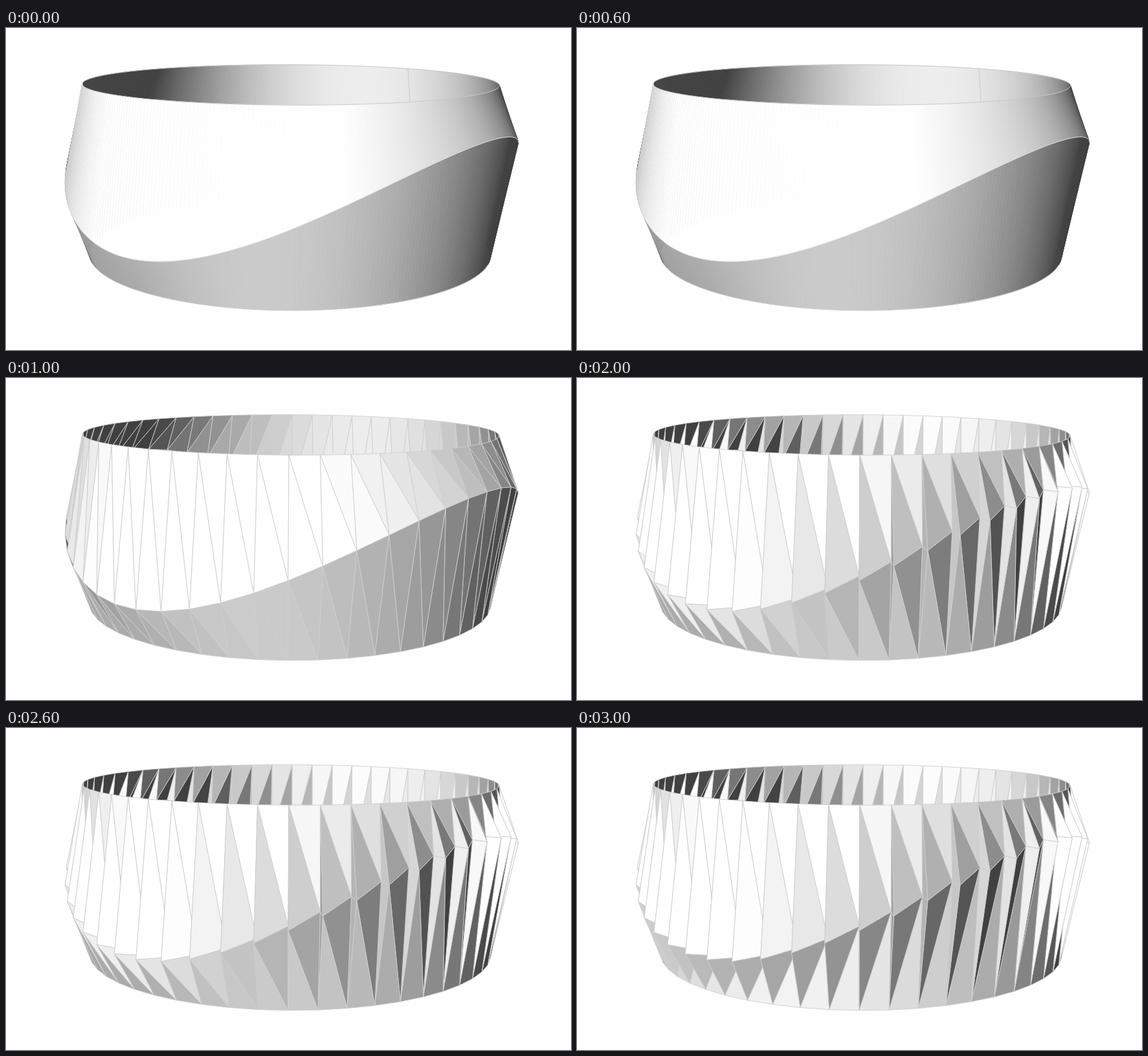
Write an HTML page with a canvas that moves like this. It is 873 px wide and 498 px high and loops after 4 s.

```html
<!DOCTYPE html>
<html lang="en">
<head>
<meta charset="utf-8">
<title>Faceted ring</title>
<style>
html, body { margin: 0; width: 100%; height: 100%; overflow: hidden; background: #fefefe; }
canvas { display: block; }
</style>
</head>
<body>
<canvas id="stage" width="873" height="498"></canvas>
<script>
(() => {
const ctx = document.getElementById('stage').getContext('2d');
const TAU = Math.PI * 2, SIDES = 52, START = -0.0075;
const TOP = 0.546, BOTTOM = -0.285, BULGE = 1.1, NOTCH = 1.03;
const FOCAL = 1404, DIST = 4.58, SIN = 0.2114, COS = 0.9774, ROLL = 0.004;
const EYE = [0, DIST * SIN, DIST * COS], LIGHT = [-0.3, 0.45, 0.7];
const LINE = '#cecece';

const sub = (a, b) => a.map((v, i) => v - b[i]);
const dot = (a, b) => a[0] * b[0] + a[1] * b[1] + a[2] * b[2];
const cross = (a, b) => [
  a[1] * b[2] - a[2] * b[1], a[2] * b[0] - a[0] * b[2], a[0] * b[1] - a[1] * b[0]];

const ring = (angle, r, y) => [r * Math.sin(angle), y, r * Math.cos(angle)];
const upper = a => ring(a, 1, TOP);
const lower = a => ring(a, 1, BOTTOM);
const middle = (a, r = BULGE) => ring(a, r, 0.13 + 0.236 * Math.sin(2 * a - 0.224));

function project([x, y, z]) {
  const scale = FOCAL / (DIST - z * COS - y * SIN);
  const px = x * scale, py = (z * SIN - y * COS) * scale;
  return [439.5 + px - ROLL * py, 249 + py + ROLL * px];
}

function trace(points) {
  ctx.beginPath();
  for (const p of points) ctx.lineTo(...project(p));
}

function shade(points) {
  const [a, b, c, d] = points;
  const n = d ? cross(sub(c, a), sub(d, b)) : cross(sub(b, a), sub(c, a));
  const side = dot(n, sub(EYE, a)) < 0 ? -1 : 1;
  const lit = side * dot(n, LIGHT) / (Math.hypot(...n) || 1);
  const v = Math.min(254, Math.round(255 * (0.25 + Math.max(0, lit))));
  return `rgb(${v},${v},${v})`;
}

// Far faces first; "at" is the angle that stands for a face.
function paint(faces, line) {
  faces.sort((f, g) => Math.cos(f.at) - Math.cos(g.at));
  for (const { points } of faces) {
    trace(points);
    ctx.closePath();
    ctx.fillStyle = shade(points);
    ctx.fill();
    ctx.strokeStyle = line || ctx.fillStyle;
    ctx.lineWidth = line ? 0.9 : 0.6;
    ctx.stroke();
  }
}

function arc(curve, from, to, color) {
  trace(Array.from({ length: 241 }, (_, i) => curve(from + (to - from) * i / 240)));
  ctx.strokeStyle = color;
  ctx.lineWidth = 1;
  ctx.stroke();
}

function drawSmooth() {
  const faces = [], n = 364, step = TAU / n;
  for (let k = 0; k < n; k++) {
    const a = START + k * step, b = a + step, at = a + step / 2;
    faces.push({ at, points: [middle(a), middle(b), lower(b), lower(a)] });
    faces.push({ at, points: [upper(a), upper(b), middle(b), middle(a)] });
  }
  const seam = START + 20 * TAU / SIDES;
  paint(faces.filter(f => Math.cos(f.at) < 0));
  trace([upper(seam), middle(seam)]);
  ctx.strokeStyle = '#c4c4c4';
  ctx.lineWidth = 0.8;
  ctx.stroke();
  paint(faces.filter(f => Math.cos(f.at) >= 0));
  arc(upper, 0, TAU, '#c8c8c8');
  arc(middle, -1.05, 1.32, '#e2e2e2');
  arc(lower, -1.12, 1.2, '#cccccc');
}

function drawFacets(notch, flipped) {
  const faces = [], step = TAU / SIDES;
  for (let k = 0; k < SIDES; k++) {
    const a = START + k * step, b = a + step;
    const add = (part, ...points) => faces.push({ at: a + part * step, points });
    const t = upper(a), t2 = upper(b), m = middle(a), c = lower(a), c2 = lower(b);
    const inner = middle(a, notch), inner2 = middle(b, notch);
    if (flipped) {
      add(0.4, m, inner2, c);
      add(0.6, c, c2, inner2);
    } else {
      add(0.4, m, c, c2);
      add(0.6, m, inner2, c2);
    }
    add(0.4, t, m, inner2);
    add(0.6, t, t2, inner2);
    if (notch < BULGE) {
      add(0, c, inner, m);
      add(0, t, inner, m);
    }
  }
  paint(faces, LINE);
}

const scenes = [
  drawSmooth,
  () => drawFacets(BULGE, false),
  () => drawFacets(NOTCH, false),
  () => drawFacets(NOTCH, true)
];
const begin = performance.now();
let shown = -1;

function tick() {
  const now = Math.floor((performance.now() - begin) / 1000) % scenes.length;
  if (now !== shown) {
    shown = now;
    ctx.fillStyle = '#fefefe';
    ctx.fillRect(0, 0, 873, 498);
    ctx.lineJoin = 'round';
    scenes[now]();
  }
  requestAnimationFrame(tick);
}
tick();
})();
</script>
</body>
</html>
```
